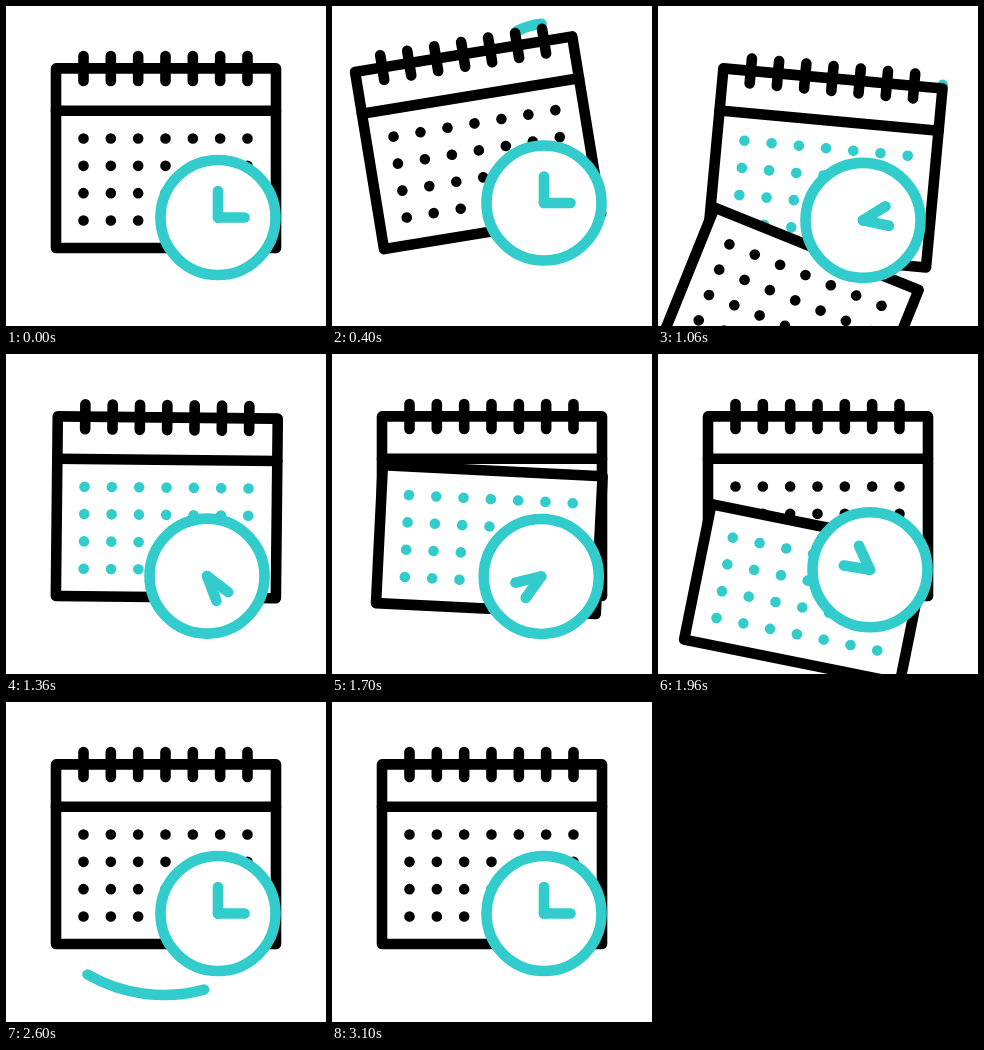
An HTML page that plays this animation: 320 by 320 pixels, repeating every 3580 ms.

```html
<!DOCTYPE html>
<html lang="en">
<head>
<meta charset="utf-8">
<title>Calendar and clock</title>
<style>
  html, body { margin: 0; width: 100%; height: 100%; overflow: hidden; background: #fff; }
  svg { display: block; width: 100vw; height: 100vh; }
  .line { stroke: #000; stroke-width: 10.6; stroke-linecap: round; stroke-linejoin: round; fill: none; }
  .sheet { fill: #fff; }
  .cyan { stroke: #32cccc; }
</style>
</head>
<body>
<svg viewBox="0 0 320 320">
  <path id="topArc" class="line cyan"/>
  <path id="lowArc" class="line cyan"/>
  <g id="calendar">
    <path class="line sheet" d="M50 62.4H270V242H50Z"/>
    <path class="line" d="M50 104.8H270"/>
    <path id="rings" class="line"/>
    <g id="calendarDots" transform="translate(50 104)"></g>
  </g>
  <g id="blackPage"></g>
  <g id="cyanPage"></g>
  <g id="clock">
    <circle class="line cyan sheet" r="57.5"/>
    <path id="minute" class="line cyan" d="M0 0V-26.5"/>
    <path id="hour" class="line cyan" d="M0 0H26.5"/>
  </g>
</svg>
<script>
const LOOP = 3580, STEP = 27.33;
const BLACK = '#000', CYAN = '#32cccc';
const el = id => document.getElementById(id);
const place = (node, value) => node.setAttribute('transform', value);

// Timing helpers: progress 0..1, there-and-back swing, and two easings.
const progress = (t, start, end) => Math.min(1, Math.max(0, (t - start) / (end - start)));
const swing = (t, start, end) => Math.sin(Math.PI * progress(t, start, end)) ** 2;
const easeInOut = u => u * u * (3 - 2 * u);
const easeOut = u => Math.sin(u * Math.PI / 2);

// A page drops with constant acceleration while it turns about its corner.
const pages = [
  { node: el('blackPage'), color: BLACK, fall: 672, pull: 0.000645, turn: [619, 917], angle: 22 },
  { node: el('cyanPage'), color: CYAN, fall: 1530, pull: 0.000249, turn: [1623, 2396], angle: 18 }
];

const arcs = [
  { node: el('topArc'), x: 216.5, y: 86, r: 68.5, from: -118, to: -4, head: [313, 765], tail: [673, 1068] },
  { node: el('lowArc'), x: 158, y: 140, r: 153, from: 120, to: 6.4, head: [2420, 2875], tail: [2800, 3100] }
];

function dots() {
  let d = '';
  for (let row = 0; row < 4; row++)
    for (let col = 0; col < 7; col++)
      d += `M${27.5 + col * STEP} ${28.5 + row * STEP}h.01`;
  return `<path d="${d}" fill="none" stroke="currentColor" stroke-width="10.6" stroke-linecap="round"/>`;
}

el('rings').setAttribute('d', Array.from({ length: 7 }, (_, i) => `M${77.5 + i * STEP} 50V75`).join(''));
el('calendarDots').innerHTML = dots();
for (const page of pages) {
  page.node.innerHTML = '<path class="line sheet" d="M0 0H220V138H0Z"/>' + dots();
  page.node.style.color = page.color;
  page.start = Math.min(page.fall, page.turn[0]);
}

function drawCalendar(t) {
  const tilt = 5.3 * swing(t, 720, 1440) - 9.4 * swing(t, 160, 610);
  place(el('calendar'), `rotate(${tilt} 58 230)`);
  const [first, second] = pages;
  el('calendarDots').style.color = t >= first.start && t < second.start ? CYAN : BLACK;
}

function drawPage({ node, start, fall, pull, turn, angle }, t) {
  const turned = angle * easeOut(progress(t, ...turn));
  const y = 104 + pull * Math.max(0, t - fall) ** 2;
  node.style.display = t >= start && y < 330 ? '' : 'none';
  place(node, `translate(${50 + 0.3 * turned} ${y}) rotate(${turned})`);
}

function drawArc({ node, x, y, r, from, to, head, tail }, t) {
  const at = span => from + (to - from) * progress(t, ...span);
  const point = deg => {
    const a = deg * Math.PI / 180;
    return `${x + r * Math.cos(a)} ${y + r * Math.sin(a)}`;
  };
  const start = at(tail), end = at(head);
  node.setAttribute('d', start === end ? '' :
    `M${point(start)}A${r} ${r} 0 0 ${to > from ? 1 : 0} ${point(end)}`);
}

function drawClock(t) {
  const lean = swing(t, 400, 1040);
  const x = 212 + 5.5 * lean - 11.2 * swing(t, 720, 1895);
  const y = 211.5 - 20.6 * swing(t, 160, 920) + 12.5 * swing(t, 840, 2240);
  place(el('clock'), `translate(${x} ${y}) rotate(${-7 * lean})`);
  place(el('minute'), `rotate(${360 * easeInOut(progress(t, 539, 2589))})`);
  place(el('hour'), `rotate(${360 * easeInOut(progress(t, 870, 2620))})`);
}

function draw(t) {
  arcs.forEach(arc => drawArc(arc, t));
  drawCalendar(t);
  pages.forEach(page => drawPage(page, t));
  drawClock(t);
}

const began = performance.now();
function tick() {
  draw((performance.now() - began) % LOOP);
  requestAnimationFrame(tick);
}
tick();
</script>
</body>
</html>
```
